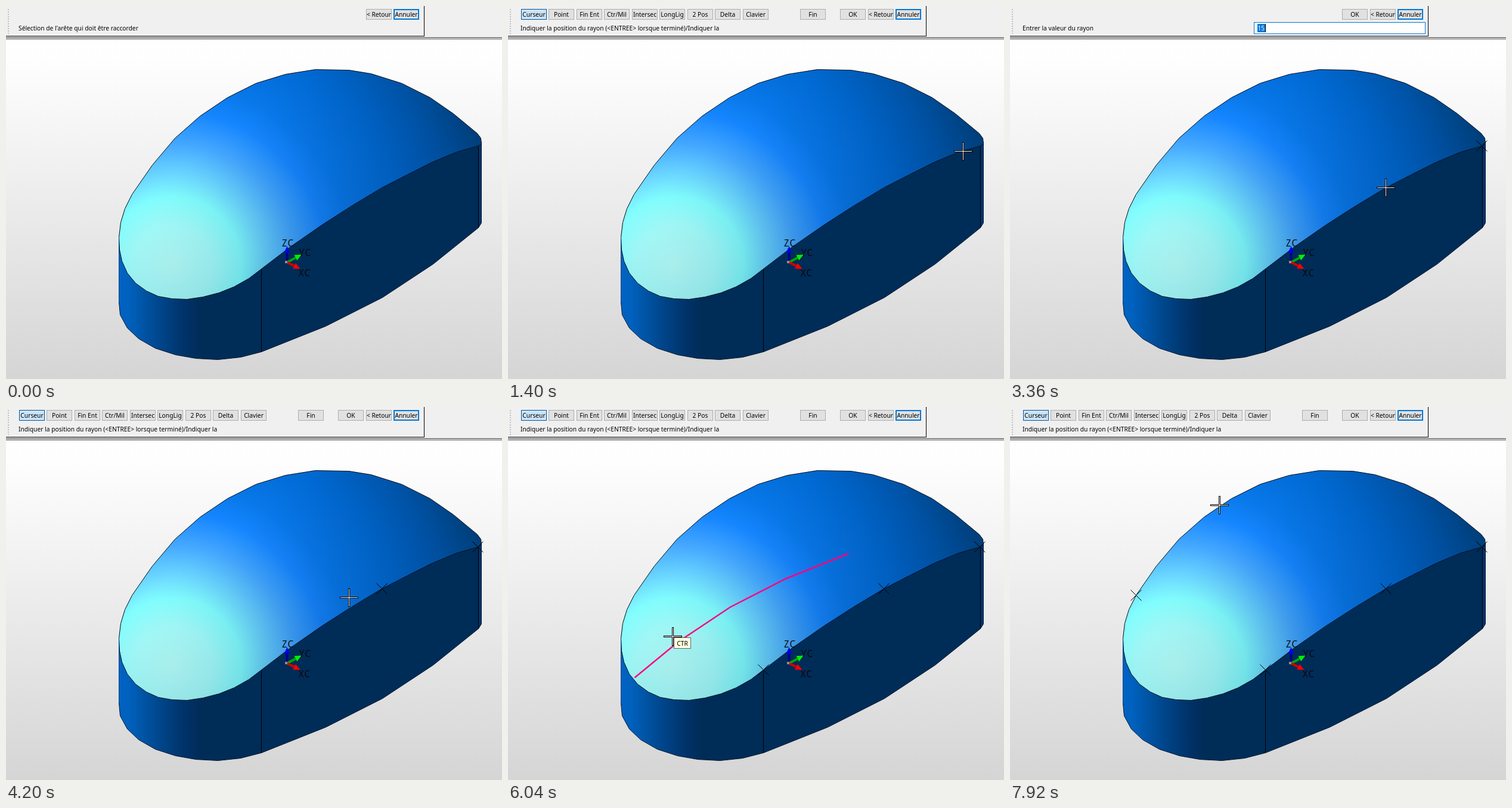
These frames come from a looping animation (832 px wide and 625 px high, 8000 ms). An HTML page with a canvas:

```html
<!DOCTYPE html>
<html lang="fr">
<head>
<meta charset="utf-8">
<title>Raccordement à rayon variable</title>
<style>
html, body { margin: 0; width: 100%; height: 100%; overflow: hidden; background: #f0f0f0; }
canvas { display: block; }
</style>
</head>
<body>
<canvas id="stage" width="832" height="625"></canvas>
<script>
const ctx = document.getElementById('stage').getContext('2d');
const LOOP = 8000, STEP = 40;
const UI_FONT = '10.25px "Noto Sans", "Open Sans", sans-serif';

// Outline of the solid, as flat x, y lists
const crest = [189,387, 192,362, 199,339, 211,315, 245,266, 283,221, 325,184, 371,153, 419,129, 468,114, 518,106,
  575,107, 612,113, 663,129, 711,153, 750,180, 790,213, 796,221, 797,230, 792,234];
const edge = [792,234, 756,244, 715,261, 673,282, 630,304, 580,334, 530,366, 478,402, 428,440];
const nose = [428,440, 407,456, 382,470, 357,480, 330,487, 303,491, 278,490, 255,486, 235,477, 217,464, 203,447,
  194,427, 190,408, 189,387];
const base = [189,495, 191,517, 203,539, 222,557, 250,573, 284,584, 318,590, 355,592, 393,588, 428,579,
  536,536, 631,488, 716,432, 792,371, 797,363];
const axis = [212,453, 285,393, 372,335, 466,287, 571,245];

// Cursor path: time, x, y
const path = [[80,540,645], [480,569,357], [960,569,357], [1400,763,243], [1720,793,237], [2360,793,237],
  [2680,706,270], [3000,630,304], [3920,630,304], [4200,575,319], [4360,490,396], [4560,428,441], [5120,428,441],
  [5240,422,439], [5640,422,439], [6000,276,384], [6160,276,384], [6560,211,315], [7360,211,315],
  [7760,312,209], [7920,351,164], [8000,351,164]];
const prompts = [[1840,2360], [3320,3800], [5040,5640], [6720,7240]];
const marks = [[2360,791,234], [3800,630,304], [5640,428,440], [7240,211,315]];
const edgeGlow = [[520,720], [3000,3320], [4520,5040], [5640,5720]];
const axisGlow = [[6000,6160], [7520,7680]];
const tips = [[4560,5040,'FIN'], [6000,6160,'CTR']];

const active = (spans, t) => spans.find(([from, to]) => t >= from && t < to);

function trace(points) {
  ctx.beginPath();
  for (let i = 0; i < points.length; i += 2) ctx.lineTo(points[i] + .5, points[i + 1] + .5);
}
function line(points, color = '#000', width = 1) {
  trace(points);
  ctx.strokeStyle = color;
  ctx.lineWidth = width;
  ctx.stroke();
}
function fill(points, color) {
  trace(points);
  ctx.fillStyle = color;
  ctx.fill();
}
function rect(x, y, w, h, color) {
  ctx.fillStyle = color;
  ctx.fillRect(x, y, w, h);
}
function box(x, y, w, h, color, border, thick = 1) {
  rect(x, y, w, h, border);
  rect(x + thick, y + thick, w - 2 * thick, h - 2 * thick, color);
}
function text(str, x, y, color = '#000', align = 'left', font = UI_FONT) {
  ctx.font = font;
  ctx.textAlign = align;
  ctx.fillStyle = color;
  ctx.fillText(str, x, y);
}
function ramp(gradient, stops) {
  stops.forEach(([at, color]) => gradient.addColorStop(at, color));
  return gradient;
}

const sky = ramp(ctx.createLinearGradient(0, 56, 0, 625), [[0, '#fff'], [.06, '#fefefe'], [1, '#d5d5d5']]);
const wall = ramp(ctx.createLinearGradient(189, 0, 325, 0),
  [[0, '#0062c4'], [.12, '#0061be'], [.45, '#004a92'], [.8, '#00336a'], [1, '#002c58']]);
const dome = ramp(ctx.createRadialGradient(280, 435, 0, 280, 435, 560),
  [[0, '#b6fffa'], [.12, '#a6fffc'], [.205, '#82ffff'], [.27, '#6cd8ff'], [.36, '#46a9ff'], [.46, '#1686ff'],
   [.54, '#0878ea'], [.71, '#0068d0'], [.86, '#0057ae'], [1, '#004380']]);
const shade = ramp(ctx.createLinearGradient(490, 130, 620, 310), [[0, 'rgba(0,30,70,0)'], [1, 'rgba(0,30,70,.14)']]);

function drawArrow(dx, dy, shaft, head) {
  const len = Math.hypot(dx, dy), ux = dx / len, uy = dy / len, x = 471, y = 429;
  const nx = x + ux * (len - 11), ny = y + uy * (len - 11);
  line([x, y, nx, ny], shaft, 4);
  fill([nx - uy * 5, ny + ux * 5, x + dx, y + dy, nx + uy * 5, ny - ux * 5], head);
}

function drawSolid() {
  rect(0, 56, 832, 569, sky);
  fill([...nose, ...base.slice(0, 20)], wall);
  fill([...edge.slice().reverse().reduce((out, v, i, a) => i % 2 ? [...out, v, a[i - 1]] : out, []).reverse()
    .reduce((out, v, i, a) => i % 2 ? [...out, v, a[i - 1]] : out, []), ...base.slice(18, 28)], '#002c58');
  fill([792,234, 797,229, 797,363, 792,371], '#003468');
  const top = [...crest, ...edge, ...nose];
  fill(top, dome);
  fill(top, shade);
  [crest, edge, nose].forEach(points => line(points, '#000b18'));
  line(base, '#00142c');
  line([189,387, 189,495], '#00407e');
  line([428,440, 428,579]);
  line([792,234, 792,371]);
  line([797,227, 797,363], '#001c3a');
}

function drawTriad() {
  drawArrow(0, -27, '#000090', '#0000e8');
  drawArrow(24, -13, '#00a800', '#00f000');
  drawArrow(22, 11, '#d00000', '#ff0000');
  rect(468, 427, 4, 4, '#909090');
  const font = '100 17px "Noto Sans Mono", "DejaVu Sans Mono", monospace';
  text('ZC', 462, 403, '#101010', 'left', font);
  text('YC', 491, 419, '#0a0a0a', 'left', font);
  text('XC', 490, 453, '#0a0a0a', 'left', font);
}

function button(label, x, color = '#e1e1e1', border = '#adadad', thick = 1) {
  x = Math.floor(x);
  box(x, 5, 43, 18, color, border, thick);
  text(label, x + 21.5, 18, '#000', 'center');
}

function drawToolbar(t) {
  const typing = active(prompts, t), selecting = t < 720;
  rect(0, 0, 832, 56, '#f0f0f0');
  rect(0, 50, 702, 1, '#000');
  rect(701, 0, 1, 51, '#000');
  rect(0, 52, 832, 1, '#a0a0a0');
  rect(0, 53, 832, 1, '#696969');
  rect(0, 54, 832, 1, '#fff');
  rect(0, 55, 832, 1, '#696969');
  for (let y = 5; y < 46; y += 4) rect(3, y, 2, 2, '#c0c0c0');

  if (!selecting && !typing) {
    button('Curseur', 22, '#cce4f7', '#005499');
    ['Point', 'Fin Ent', 'Ctr/Mil', 'Intersec', 'LongLig', '2 Pos', 'Delta', 'Clavier']
      .forEach((label, i) => button(label, 68.5 + 46.5 * i));
    button('Fin', 490);
  }
  if (!selecting) button('OK', 557);
  button('< Retour', 604);
  button('Annuler', 650, '#e1e1e1', '#0078d7', 2);

  text(selecting ? "Sélection de l'arête qui doit être raccorder"
    : typing ? 'Entrer la valeur du rayon'
    : 'Indiquer la position du rayon (<ENTREE> lorsque terminé)/Indiquer la', 21, 41);
  if (typing) {
    box(409, 27, 288, 20, '#fff', '#0078d7');
    rect(415, 30, 13, 14, '#0078d7');
    rect(428, 30, 1, 14, '#000');
    text('15', 415.5, 41, '#fff');
  }
}

function cursorAt(t) {
  const i = path.findIndex(([time]) => time > t);
  if (i < 1) return path[0].slice(1);
  const [t0, x0, y0] = path[i - 1], [t1, x1, y1] = path[i];
  const k = (t - t0) / (t1 - t0);
  return [Math.round(x0 + (x1 - x0) * k), Math.round(y0 + (y1 - y0) * k)];
}

function drawCursor(t) {
  const [x, y] = cursorAt(t);
  rect(x - 15, y - 1, 31, 3, '#000');
  rect(x - 1, y - 15, 3, 31, '#000');
  rect(x - 14, y, 29, 1, '#fff');
  rect(x, y - 14, 1, 29, '#fff');
  const tip = active(tips, t);
  if (tip) {
    box(x + 2, y + 2, 29, 19, '#ffffe1', '#646464');
    text(tip[2], x + 16.5, y + 16, '#000', 'center');
  }
}

function draw(t) {
  drawSolid();
  if (active(edgeGlow, t)) line(edge, '#ff0080', 2.5);
  if (active(axisGlow, t)) line(axis, '#ff0080', 2.5);
  drawTriad();
  for (const [from, x, y] of marks) {
    if (t < from) continue;
    line([x - 9, y - 9, x + 9, y + 9]);
    line([x - 9, y + 9, x + 9, y - 9]);
  }
  drawCursor(t);
  drawToolbar(t);
}

const start = performance.now();
function tick() {
  const t = (performance.now() - start) % LOOP;
  draw(Math.floor(t / STEP) * STEP);
  requestAnimationFrame(tick);
}
tick();
</script>
</body>
</html>
```
